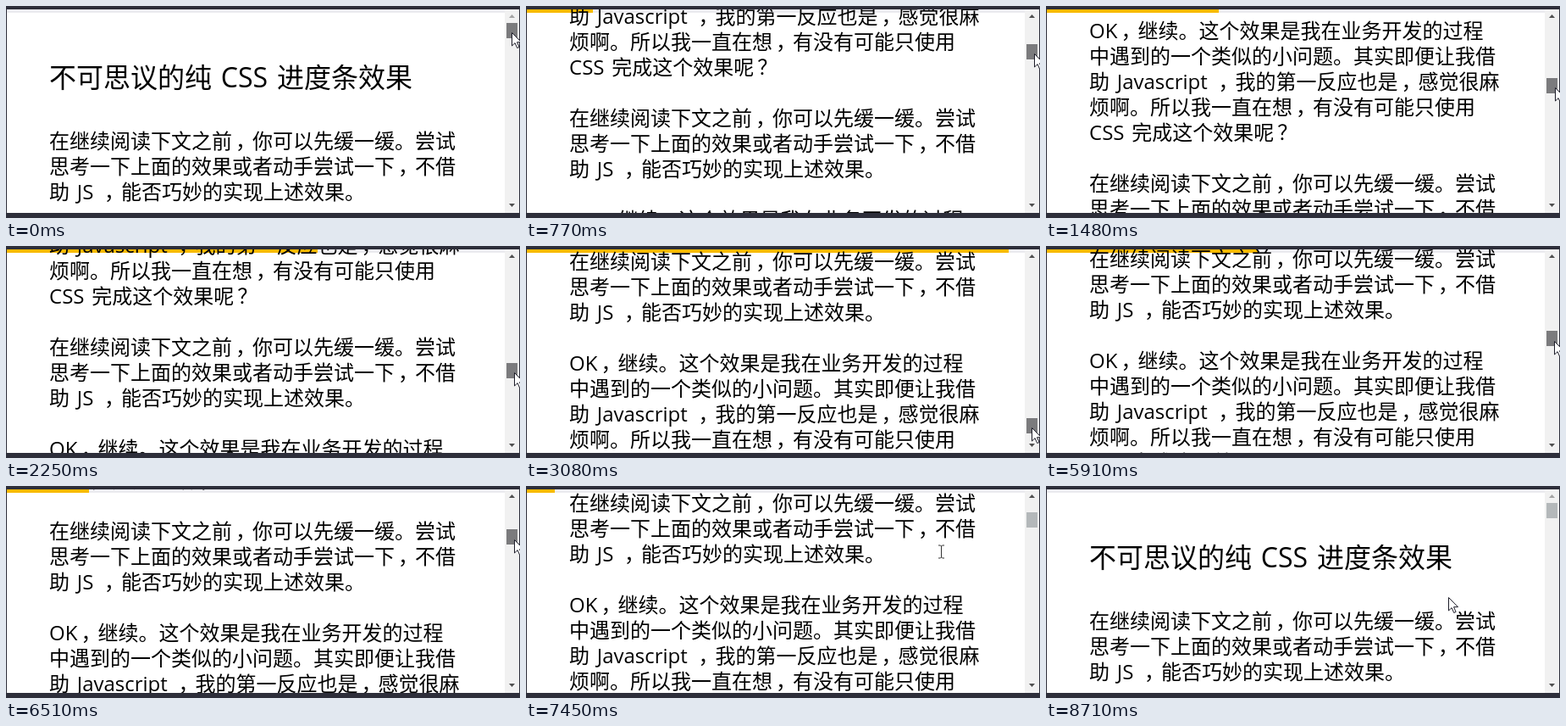
An HTML page for the animation above (8.76 s loop, 607 by 250 pixels).

```html
<!DOCTYPE html>
<html lang="zh-CN">
<head>
<meta charset="utf-8">
<title>进度条效果</title>
<style>
  html, body { margin: 0; width: 100%; height: 100%; overflow: hidden; background: #fff; }
  #stage { position: relative; width: 607px; height: 250px; overflow: hidden; background: #fff; }
  #stage > * { position: absolute; }
  #progress { left: 1px; top: 4px; width: 588px; height: 4px; background: #ececf0; }
  #fill { height: 100%; background: #f9ba00; }
  #view { left: 0; top: 4px; width: 589px; height: 240px; overflow: hidden; }
  #page { position: absolute; left: 51px; top: -5px; color: #000;
    font: 24px/30px "Open Sans", "Noto Sans CJK SC", "Noto Sans CJK", sans-serif; }
  #page div { position: absolute; white-space: pre; word-spacing: 2.5px; }
  #page .title { font-size: 32px; line-height: 40px; }
  #page .item { letter-spacing: -.4px; }
  #page span { position: relative; left: 4px; }
  #track { left: 589px; top: 4px; width: 17px; height: 240px; background: #f1f1f1; }
  #thumb { left: 591px; width: 13px; height: 18px; }
  #frame { inset: 0; border: solid #2d2e3a; border-width: 4px 1px 6px; }
  svg { left: 0; top: 0; }
</style>
</head>
<body>
<div id="stage">
  <div id="progress"><div id="fill"></div></div>
  <div id="view"><div id="page"></div></div>
  <div id="track"></div>
  <div id="thumb"></div>
  <div id="frame"></div>
  <svg width="607" height="250">
    <path id="up" d="M594 14h7l-3.5-4z"/>
    <path id="down" d="M594 233h7l-3.5 4z"/>
    <path id="arrow" d="M.5.5v15.5l3.6-3.4 2.6 5.9 2.4-1-2.6-5.8h5z" fill="#fff" stroke="#1c1c28"/>
    <path id="beam" d="M-3.5-7.5h2.5l1 1 1-1h2.5M0-6.5v13M-3.5 7.5h2.5l1-1 1 1h2.5" fill="none" stroke="#333"/>
  </svg>
</div>
<script>
const LOOP = 8760, MAX = 2469, TRAVEL = 188.6;
const RISE = 4330, RELEASE = 6900, WHEEL = 7000, WHEEL_END = 8640;
const $ = id => document.getElementById(id);

const pause = [
  '在继续阅读下文之前，你可以先缓一缓。尝试',
  '思考一下上面的效果或者动手尝试一下，不借',
  '助 JS ，能否巧妙的实现上述效果。'
];
const story = [
  'OK，继续。这个效果是我在业务开发的过程',
  '中遇到的一个类似的小问题。其实即便让我借',
  '助 Javascript ，我的第一反应也是，感觉很麻',
  '烦啊。所以我一直在想，有没有可能只使用',
  'CSS 完成这个效果呢？'
];
const list = [1, 2, 3, 4].map(n => n + '.' + 'x'.repeat(21));

function addLine(text, top, kind = '') {
  const el = document.createElement('div');
  // Commas and question marks sit near the middle of their cell
  el.innerHTML = text.replace(/[，？]/g, '<span>$&</span>');
  el.style.top = top + 'px';
  el.className = kind;
  $('page').append(el);
}

let y = 145;
function addBlock(lines, kind) {
  for (const text of lines) {
    addLine(text, y, kind);
    y += 30;
  }
  y += 30;
}

addLine('不可思议的纯 CSS 进度条效果', 65, 'title');
for (let k = 0; k < 8; k++) {
  addBlock(pause);
  if (k === 6) addBlock(list, 'item');
  addBlock(story);
}

// Progress from 0 to 1 between two times
const go = (t, from, to) => Math.min(1, Math.max(0, (t - from) / (to - from)));

// Drag down, drag up, then a short turn of the wheel
function scrollAt(t) {
  if (t < RISE) return Math.min(MAX, 2390 * (Math.max(0, t - 70) / 3010) ** 1.364);
  if (t < WHEEL) return Math.max(0, MAX - 1424 * ((t - RISE) / 1580) ** 1.15);
  return 240 * Math.sin(Math.PI * go(t, WHEEL, WHEEL_END)) ** 2;
}

function pointerAt(t, thumbY) {
  if (t < RISE) {
    const overshoot = 15 * Math.sin(Math.PI * go(t, 3130, 3860));
    return [597 + 4 * Math.sin(Math.PI * go(t, 0, 3000)), thumbY + 11 + overshoot];
  }
  if (t < RELEASE) return [596 + 4 * go(t, RISE, 5910), thumbY + 12];
  const away = go(t, RELEASE, 7400), rest = go(t, 8000, WHEEL_END);
  return [600 - 110 * away - 15 * rest, 32 + 45 * away + 54 * rest];
}

function thumbColor(t) {
  if (t > RELEASE) return '#b4b8ba';
  return t > 3550 && t < 4180 ? '#a8a8a8' : '#7b7b7d';
}

function draw(t) {
  const scroll = scrollAt(t), part = scroll / MAX;
  const thumbY = 20 + part * TRAVEL;
  const [px, py] = pointerAt(t, thumbY).map(Math.round);
  $('page').style.transform = `translateY(${-Math.round(scroll)}px)`;
  $('fill').style.width = Math.round(part * 588) + 'px';
  $('thumb').style.top = Math.round(thumbY) + 'px';
  $('thumb').style.background = thumbColor(t);
  $('up').setAttribute('fill', scroll < 1 ? '#a3a3a3' : '#505050');
  $('down').setAttribute('fill', scroll > MAX - 1 ? '#a3a3a3' : '#505050');

  const overText = px < 589 && t < 8400;
  $('arrow').style.display = overText ? 'none' : '';
  $('beam').style.display = overText ? '' : 'none';
  $('arrow').setAttribute('transform', `translate(${px} ${py})`);
  $('beam').setAttribute('transform', `translate(${px + .5} ${py + .5})`);
}

const start = performance.now();
function tick() {
  draw((performance.now() - start) % LOOP);
  requestAnimationFrame(tick);
}
tick();
</script>
</body>
</html>
```
